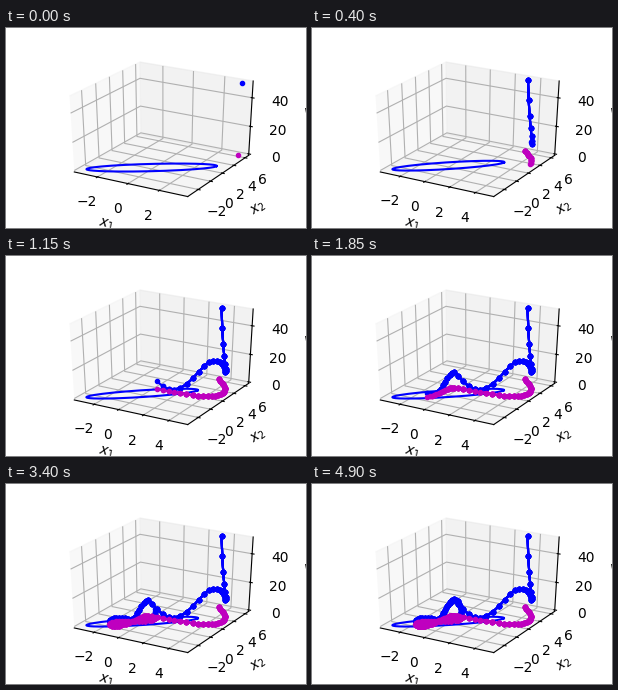
Animation of 300x200 px, one loop 4.95 s. Source, as a matplotlib script:

```python
import numpy as np
import matplotlib.pyplot as plt
from matplotlib.animation import FuncAnimation
from matplotlib.ticker import MultipleLocator

FRAMES = 99
INTERVAL = 50
LAYERS = 8  # recent paths that stay drawn on top of each other

# Entry of the trajectory, one point (x1, x2) every five steps
ENTRY = [(3.3, 6.0), (4.48, 4.5), (4.85, 3.0), (4.0, 1.88), (1.82, 1.53)]
ENTRY_STEP = 5
ENTRY_END = ENTRY_STEP * len(ENTRY)


def loop(k):
    """Forced cycle near the origin: a tilted, narrow figure of eight."""
    phase = 0.13 * (np.asarray(k) - 20)
    swing, twist = np.cos(phase), np.sin(2 * phase)
    return np.stack([-0.7 + 0.95 * swing - 0.35 * twist,
                     -0.25 + 1.65 * swing + 0.3 * twist], axis=-1)


def hermite(t, points):
    """Smooth curve through evenly spaced points; t counts points."""
    slopes = np.gradient(points, axis=0)
    i = t.astype(int)
    s = (t - i)[:, None]
    return ((1 + 2 * s) * (1 - s) ** 2 * points[i]
            + s * (1 - s) ** 2 * slopes[i]
            + s ** 2 * (3 - 2 * s) * points[i + 1]
            + s ** 2 * (s - 1) * slopes[i + 1])


steps = np.arange(FRAMES)
knots = np.vstack([ENTRY, loop([ENTRY_END, ENTRY_END + ENTRY_STEP])])
x1, x2 = np.vstack([hermite(steps[:ENTRY_END] / ENTRY_STEP, knots),
                    loop(steps[ENTRY_END:])]).T
v = 4.13 * x1 ** 2 - 8.04 * x1 * x2 + 4.57 * x2 ** 2

# Tilted ellipse on the floor
angle = np.linspace(0, 2 * np.pi, 200)
ex = 3.08 * np.cos(angle)
ey = 3.0 * np.cos(angle - 0.33)


def padded(lo, hi, margin):
    """Limits with a data margin plus the small gap to the panes."""
    pad = margin * (hi - lo)
    lo, hi = lo - pad, hi + pad
    gap = (hi - lo) / 48
    return lo - gap, hi + gap


fig = plt.figure(figsize=(3, 2), dpi=100)
ax = fig.add_subplot(projection="3d")
ax.view_init(elev=30, azim=-60)
# Let the cube fill the wide axes rectangle instead of a square
ax.apply_aspect = lambda position=None: None
ax.set_box_aspect((1, 1, 1), zoom=np.sqrt(3) / 1.8294640721620434)

for axis, spacing in ((ax.xaxis, 2), (ax.yaxis, 2), (ax.zaxis, 20)):
    axis.set_major_locator(MultipleLocator(spacing))
ax.set_xlabel("$x_1$")
ax.set_ylabel("$x_2$")
ax.set_zlabel("$V$", labelpad=3.6)

ax.plot(ex, ey, np.zeros_like(ex), "b-")
layers = [[ax.plot(x1[:1], x2[:1], v[:1], style)[0] for style in ("b.-", "m.-")]
          for _ in range(LAYERS)]


def update(k):
    for lag, (surface, floor) in enumerate(reversed(layers)):
        n = max(k + 1 - lag, 0)
        for line, height in ((surface, v), (floor, 0 * v)):
            line.set_visible(n > 0)
            line.set_data_3d(x1[:n], x2[:n], height[:n])
    ax.set_xlim(*padded(ex.min(), max(ex.max(), x1[:k + 1].max()), 0.05))
    ax.set_ylim(*padded(ey.min(), x2[0], 0.05))
    ax.set_zlim(*padded(0, v[0], 0))


anim = FuncAnimation(fig, update, frames=FRAMES, interval=INTERVAL,
                     init_func=lambda: update(0), repeat=True, repeat_delay=0)
plt.show()
```
